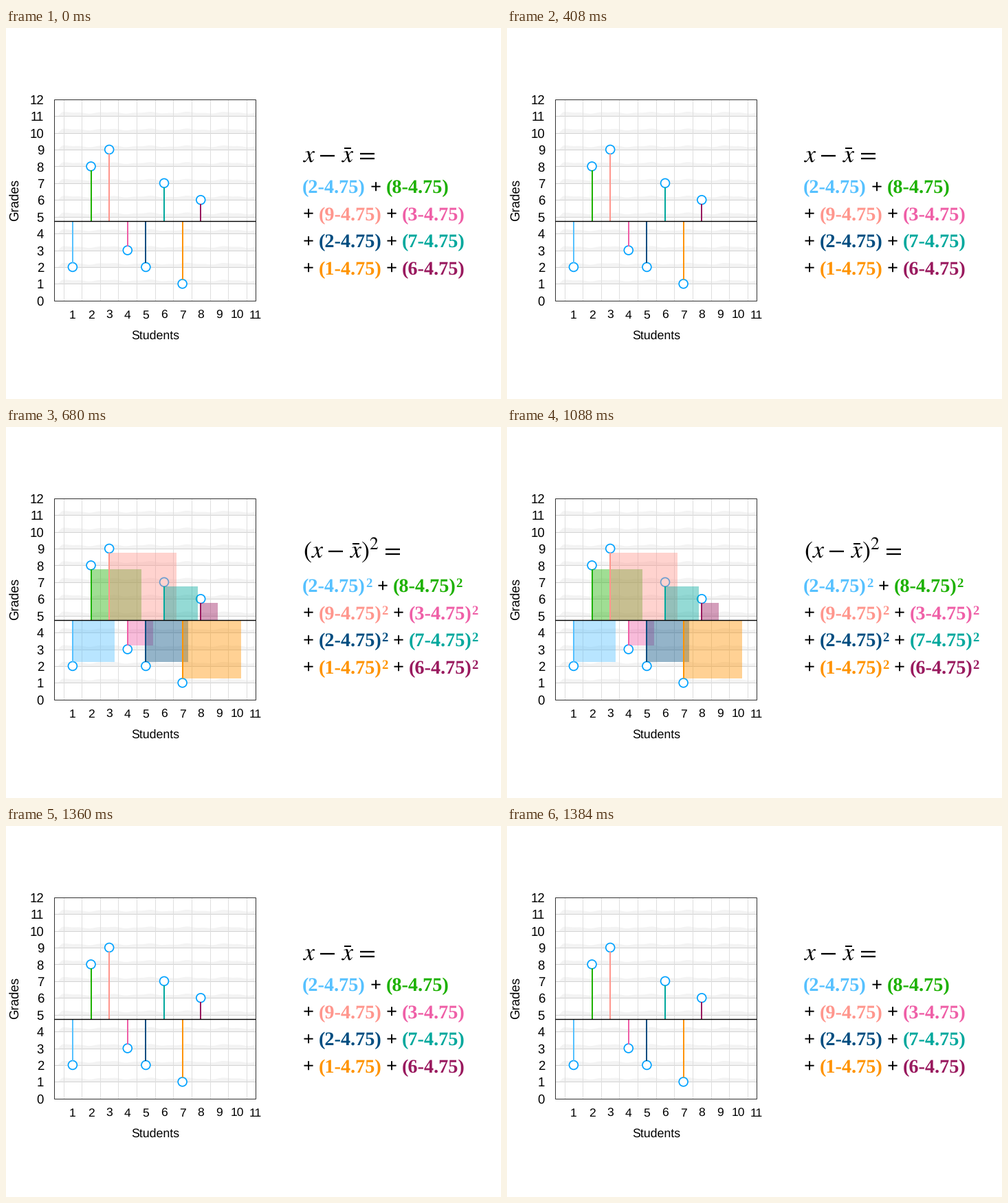
A matplotlib script for the animation above (1400 ms loop, 720 by 540 pixels).

```python
import matplotlib.pyplot as plt
import numpy as np
from matplotlib.animation import FuncAnimation
from matplotlib.patches import Circle, Rectangle

plt.rcParams["mathtext.fontset"] = "stix"
plt.rcParams["text.hinting"] = "none"

W, H, DPI = 720, 540, 100
PT = 72 / DPI
STEP = 40
FRAMES = 35
SWITCH_ON, SWITCH_OFF = 680, 1360

LEFT, RIGHT, TOP, BOTTOM = 70.3, 363.1, 103.7, 396.8
DX = (RIGHT - LEFT) / 11
DY = (BOTTOM - TOP) / 12
MEAN = 4.75
RADIUS = 6.4

GRADES = [2, 8, 9, 3, 2, 7, 1, 6]
COLORS = ["#56c1ff", "#1db100", "#ff968d", "#ef5fa7",
          "#004d80", "#00a89d", "#ff9300", "#99195e"]

fig = plt.figure(figsize=(W / DPI, H / DPI), dpi=DPI, facecolor="white")
ax = fig.add_axes([0, 0, 1, 1])
ax.set_xlim(0, W)
ax.set_ylim(H, 0)
ax.axis("off")


def px(student):
    return LEFT + student * DX


def py(grade):
    return BOTTOM - grade * DY


def line(x0, y0, x1, y1, color="black", width=1.0, z=1):
    return ax.plot([x0, x1], [y0, y1], color=color, lw=width * PT,
                   solid_capstyle="butt", zorder=z)[0]


def text(x, y, s, size, ha="left", font="Liberation Sans", **kw):
    return ax.text(x, y, s, fontsize=size * PT, ha=ha, va="baseline",
                   family=font, zorder=6, **kw)


def bold(x, y, s, size, color="black"):
    return text(x, y, s, size, font="Liberation Serif", color=color,
                weight="bold")


def draw_grid():
    xs = np.linspace(76, RIGHT, 200)
    wave = 5.3 + 0.9 * np.sin((xs - 76) / 9.2) + 0.5 * np.sin((xs - 76) / 4.1)
    height = wave * np.clip((xs - 74) / 7, 0, 1)
    for k in range(1, 12):
        y = py(k)
        ax.fill_between(xs, y - height, y, color="#f3f3f3", lw=0, zorder=0)
        line(LEFT, y, RIGHT, y, "#d2d2d2")
    # vertical lines fall between the students
    for k in range(11):
        line(px(k + 0.5), TOP, px(k + 0.5), BOTTOM, "#dedede")
    ax.add_patch(Rectangle((LEFT, TOP), RIGHT - LEFT, BOTTOM - TOP, fill=False,
                           ec="#333333", lw=PT, zorder=2))


def draw_labels():
    for k in range(13):
        text(55, py(k) + 7, str(k), 18.7, "right")
    for k in range(1, 12):
        text(px(k), 423.3, str(k), 17.5, "center")
    text(217, 453.3, "Students", 17.7, "center")
    text(18.3, 250, "Grades", 18.7, "center", rotation=90,
         rotation_mode="anchor")


def draw_data():
    """Draw markers and stems; return the squares built on the stems."""
    squares = []
    for i, (grade, color) in enumerate(zip(GRADES, COLORS)):
        x, y, base = px(i + 1), py(grade), py(MEAN)
        side = abs(y - base) - RADIUS + 0.4
        up = grade > MEAN
        end = base - side if up else base + side
        line(x, base, x, end, color, 2, 4)
        ax.add_patch(Circle((x, y), RADIUS, fc="white", ec="#00a2ff",
                            lw=1.7 * PT, zorder=2.5))
        square = Rectangle((x, min(base, end)), side, side, fc=color,
                           lw=0, alpha=0.42, zorder=3)
        squares.append(ax.add_patch(square))
    line(LEFT, py(MEAN), RIGHT, py(MEAN), "black", 1.4, 5)
    return squares


def draw_terms(squared):
    size = 28.2
    space, plus, term = 0.25 * size, 0.57 * size, 3.249 * size
    parts = []
    for i, (grade, color) in enumerate(zip(GRADES, COLORS)):
        y = 240.3 + 39.6 * (i // 2)
        if i % 2 == 0:
            x = 431.2
        if i > 0:
            x += space if i % 2 else 0
            parts.append(bold(x, y, "+", size))
            x += plus + space
        parts.append(bold(x, y, f"({grade}-4.75)", size, color))
        x += term
        if squared:
            parts.append(bold(x, y - 7, "2", size * 2 / 3, color))
            x += size / 3
    return parts


def draw_formula(squared):
    size = 36
    left = 431.5
    y = 190.3 if squared else 195.3
    x = left + 12 if squared else left
    axis = y - 0.253 * size
    bar_x = x + 56.5

    def stroke(x0, length, y0, width=2.3):
        return line(x0, y0, x0 + length, y0, "black", width, 6)

    parts = [text(x, y, "$x$", size), text(bar_x, y, "$x$", size),
             stroke(x + 25.8, 20.5, axis),
             stroke(bar_x + 3.5, 10.5, y - 20.8, 2)]
    eq = bar_x + 26.5
    if squared:
        parts += [text(left, y, "$($", size), text(bar_x + 16, y, "$)$", size),
                  text(bar_x + 27.7, y - 12.4, "$2$", 25.5)]
        eq += 25
    parts += [stroke(eq, 21.8, axis + d) for d in (-3.6, 3.6)]
    return parts


draw_grid()
draw_labels()
squares = draw_data()
plain = draw_formula(False) + draw_terms(False)
squared = squares + draw_formula(True) + draw_terms(True)


def update(frame):
    on = SWITCH_ON <= frame * STEP < SWITCH_OFF
    for part in plain:
        part.set_visible(not on)
    for part in squared:
        part.set_visible(on)
    return plain + squared


anim = FuncAnimation(fig, update, frames=FRAMES, interval=STEP,
                     repeat=True, repeat_delay=0, blit=False)
plt.show()
```
